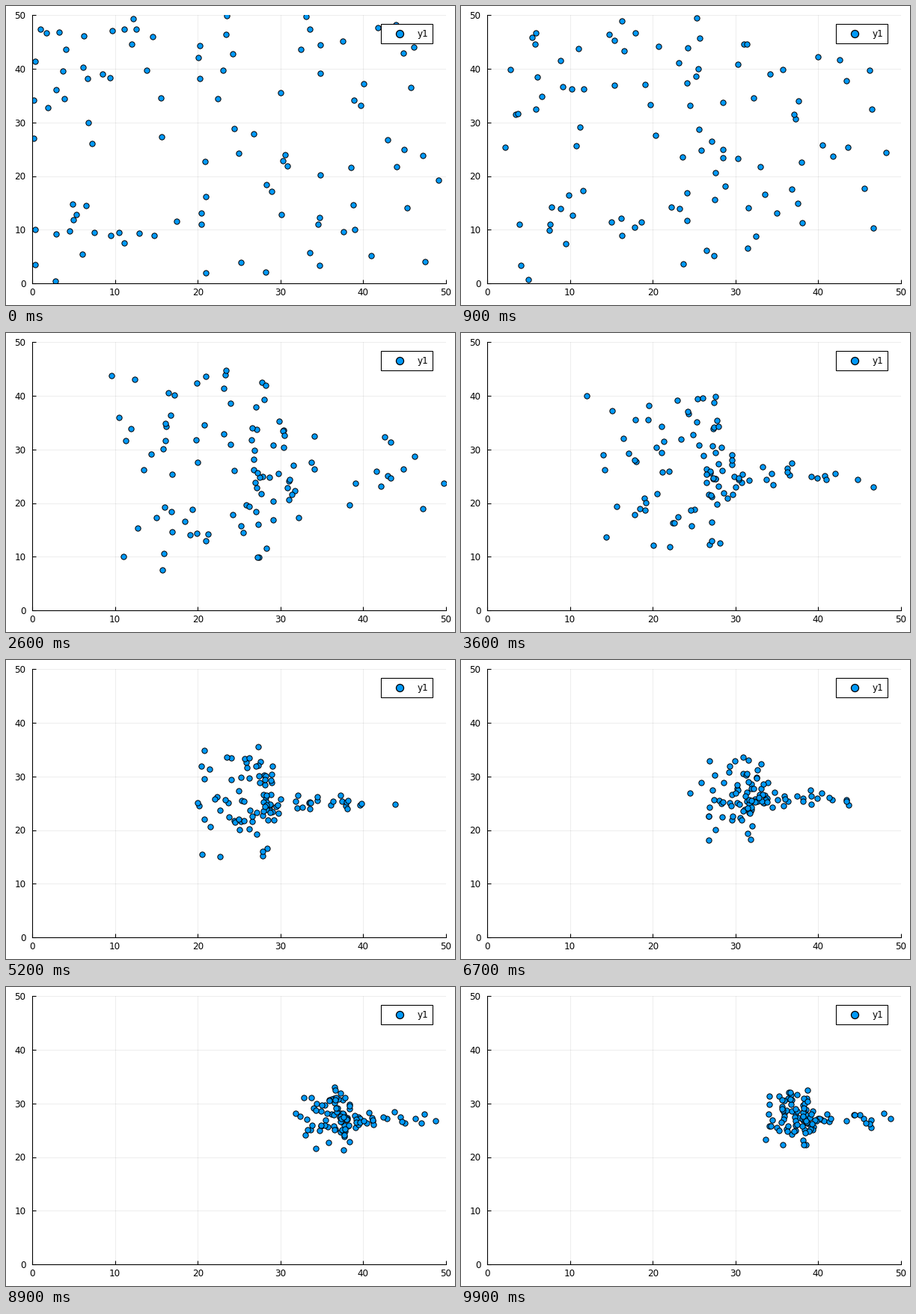
Recreate the animation shown at these times as a matplotlib script. Size 600 by 400 pixels, loop 10000 ms.

```python
import numpy as np
import matplotlib.pyplot as plt
from matplotlib.animation import FuncAnimation
from matplotlib.patches import Rectangle

W, H = 600, 400
FRAMES, STEP = 100, 100
AGENTS = 100
BLUE = "#009AFA"
PT = 0.72  # points per pixel at 100 dpi

plt.rcParams["font.family"] = "DejaVu Sans"

# Agents start anywhere; each then wanders around its place in the flock.
rng = np.random.default_rng(12)
home = rng.uniform(-1, 1, (AGENTS, 2))
rate = rng.uniform(0.05, 0.17, (2, AGENTS, 2))
phase = rng.uniform(0, 2 * np.pi, (2, AGENTS, 2))
reach = rng.normal(0, 1, (AGENTS, 2))


def smooth(t):
    t = np.clip(t, 0, 1)
    return t * t * (3 - 2 * t)


def shrink(f, end, span):
    """Half-width falling from 25 to end."""
    return end + (25 - end) * np.exp(-(f / span) ** 2)


def power(v, p):
    return np.sign(v) * np.abs(v) ** p


def flock(f):
    gather = min(f / 36, 1)
    start = min(f / 17, 1)
    drift, stray = np.sin(rate * f + phase)
    u, v = np.clip(home + 0.08 * start * drift, -1, 1).T

    # The flock tightens with a long tail to the right, then moves right.
    cx = 25 + 2.2 * start + 11 * smooth((f - 42) / 55)
    cy = 25 + 2 * smooth((f - 55) / 30)
    side = np.where(u < 0, shrink(f, 4.5, 38), shrink(f, 11, 60))
    x = cx + side * power(u, 1 + 1.6 * gather)
    squash = 1 - 0.87 * gather * smooth(u / 0.6)
    y = cy + shrink(f, 5.5, 45) * power(v, 1 + 1.2 * min(f / 60, 1)) * squash
    return np.column_stack([x, y]) + 0.8 * start * reach * stray


fig = plt.figure(figsize=(W / 100, H / 100), dpi=100, facecolor="white")
L, R, T, B = 35, 588, 11.8, 371.3
ax = fig.add_axes([L / W, 1 - B / H, (R - L) / W, (B - T) / H])
ax.set(xlim=(0, 50), ylim=(0, 50), xticks=range(0, 51, 10), yticks=range(0, 51, 10))
ax.set_axisbelow(True)
ax.grid(color="black", alpha=0.1, lw=0.5)
ax.tick_params(direction="in", length=5 * PT, width=0.8, labelsize=12 * PT)
ax.tick_params(axis="x", pad=6 * PT)
ax.tick_params(axis="y", pad=8.5 * PT)
ax.spines[["top", "right"]].set_visible(False)
ax.spines[["left", "bottom"]].set_linewidth(0.8)


def dots(axes, size, edge, **kw):
    return axes.plot([], [], "o", ms=size * PT, mfc=BLUE, mec="black",
                     mew=edge * PT, **kw)[0]


points = dots(ax, 7.3, 1.0, zorder=2.2)

top = fig.add_axes([0, 0, 1, 1], facecolor="none")
top.set(xlim=(0, W), ylim=(H, 0))
top.axis("off")
box = top.add_patch(Rectangle((501, 23.5), 68.5, 26, fc="white", ec="black",
                              lw=1.1 * PT))
key = dots(top, 10, 1.3)
name = top.text(549.5, 41, "y1", size=12 * PT, va="baseline")


def update(f):
    points.set_data(*flock(f).T)
    # The legend briefly jumps to the emptier left corner.
    dx = -448 if 14 <= f <= 18 else 0
    box.set_x(501 + dx)
    key.set_data([525.5 + dx], [36.6])
    name.set_x(549.5 + dx)
    return points, box, key, name


anim = FuncAnimation(fig, update, frames=FRAMES, interval=STEP, repeat=True,
                     repeat_delay=0, init_func=lambda: update(0))
plt.show()
```
